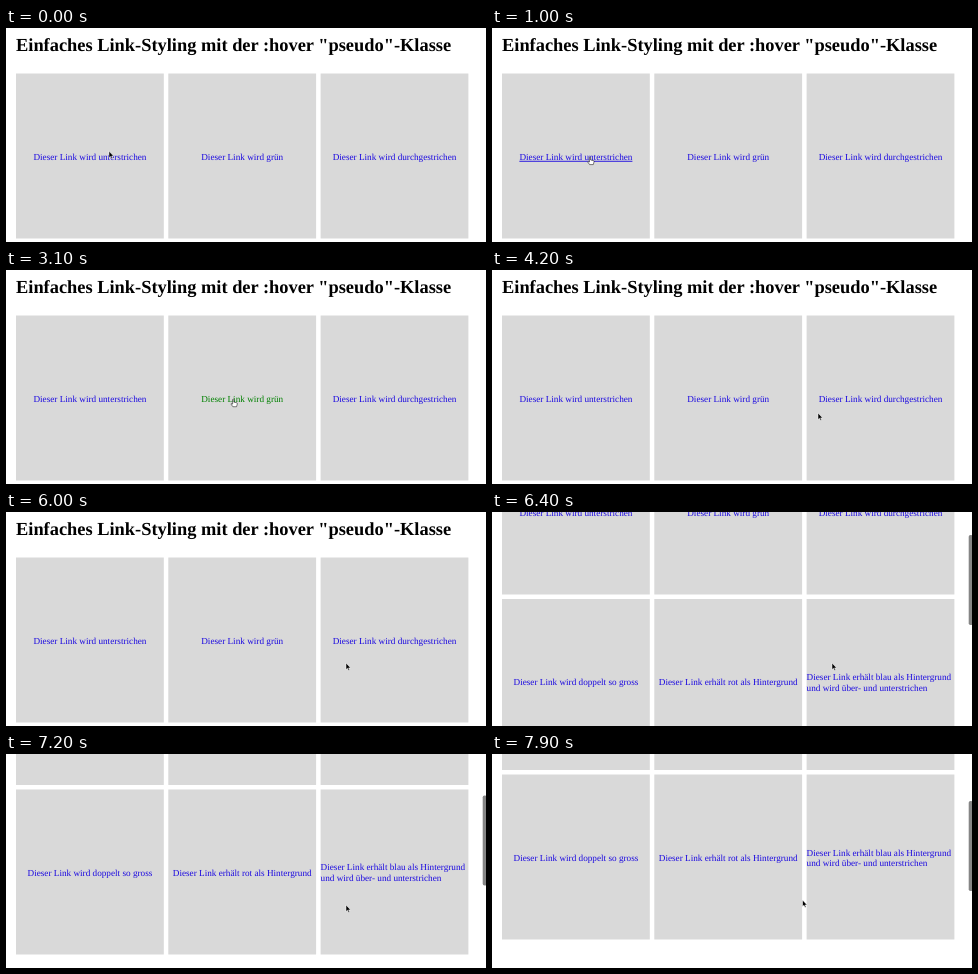
Write an HTML page that moves like this. It is 480 by 214 pixels and loops after 8000 ms.

```html
<!DOCTYPE html>
<html lang="de">
<head>
<meta charset="utf-8">
<title>Link-Styling</title>
<style>
  html, body { margin: 0; width: 100%; height: 100%; overflow: hidden; background: #fff; }
  svg { display: block; width: 480px; height: 214px; }
  text { font: 9.2px "Liberation Serif", Times, serif; fill: #1c0ae0; text-rendering: geometricPrecision; }
  .title { font-size: 18.4px; font-weight: bold; fill: #000; }
  .box { fill: #d9d9d9; }
  .hover-under { text-decoration: underline; }
  .hover-green { fill: #008000; }
  .hover-through { text-decoration: line-through; }
</style>
</head>
<body>
<svg viewBox="0 0 480 214">
  <g id="page">
    <text class="title" x="10" y="23">Einfaches Link-Styling mit der :hover "pseudo"-Klasse</text>
  </g>
  <rect id="thumb" x="476.7" width="4" height="90" rx="1.8" fill="#858585"/>
  <g id="cursor" stroke="#fff" stroke-width=".5" stroke-linejoin="round">
    <path id="arrow" d="M0 0V6.6L1.5 5.3L2.5 7.6L3.6 7.1L2.6 4.9H4.6Z" fill="#000"/>
    <path id="hand" d="M-.6 .3Q0-.4 .6 .3V3L3.6 3.7Q4.2 4 4 5L3.3 7.6H-.4L-2.3 4.8Q-2.1 3.8-.6 5Z" fill="#fff" stroke="#000"/>
  </g>
</svg>
<script>
const LOOP = 8000, STEP = 100;
const BOX_W = 147.8, BOX_H = 165, COL = 152.3, ROW = 169.5, LEFT = 10, TOP = 45.5;
const BASELINE = 86.3, LINE = 10.6;

const cells = [
  { lines: ["Dieser Link wird unterstrichen"], hover: "hover-under" },
  { lines: ["Dieser Link wird grün"], hover: "hover-green" },
  { lines: ["Dieser Link wird durchgestrichen"], hover: "hover-through" },
  { lines: ["Dieser Link wird doppelt so gross"] },
  { lines: ["Dieser Link erhält rot als Hintergrund"] },
  { lines: ["Dieser Link erhält blau als Hintergrund", "und wird über- und unterstrichen"] }
];

// time, x, y of the pointer tip
const pointerPath = [
  [0, 103, 123.2], [200, 101, 128], [1000, 98, 129], [1300, 102, 140],
  [2000, 196.5, 140], [2400, 222, 130], [3200, 228, 129], [3600, 240, 142],
  [4200, 326, 143], [4500, 365, 130], [5200, 368, 129], [5600, 355, 145],
  [6000, 340, 151], [7400, 340, 151], [7900, 310.5, 146]
];
const scrollStart = [[6100, 0], [6200, 28], [6300, 80], [6400, 128]];

const byId = id => document.getElementById(id);
const page = byId("page");

function add(tag, attrs, content = "") {
  const node = document.createElementNS("http://www.w3.org/2000/svg", tag);
  for (const key in attrs) node.setAttribute(key, attrs[key]);
  node.textContent = content;
  return page.appendChild(node);
}

cells.forEach((cell, i) => {
  const x = LEFT + COL * (i % 3), y = TOP + ROW * Math.floor(i / 3);
  const single = cell.lines.length === 1;
  add("rect", { class: "box", x, y, width: BOX_W, height: BOX_H });
  cell.nodes = cell.lines.map((line, n) => add("text", {
    x: single ? x + BOX_W / 2 : x,
    y: y + BASELINE + (single ? 0 : (n - 0.5) * LINE),
    "text-anchor": single ? "middle" : "start"
  }, line));
  cell.center = x + BOX_W / 2;
  cell.base = y + BASELINE;
});

function sample(table, t) {
  const next = table.findIndex(row => row[0] > t);
  if (next === 0) return table[0].slice(1);
  if (next < 0) return table[table.length - 1].slice(1);
  const a = table[next - 1], b = table[next];
  const k = (t - a[0]) / (b[0] - a[0]);
  return a.slice(1).map((v, i) => v + (b[i + 1] - v) * k);
}

// quick swipe, then inertia fading out
function scrollAt(t) {
  return t < 6400 ? sample(scrollStart, t)[0] : 203 - 75 * Math.exp((6400 - t) / 689);
}

function draw(t) {
  const scroll = scrollAt(t);
  const [x, y] = sample(pointerPath, t);
  page.setAttribute("transform", `translate(0 ${-scroll})`);
  byId("thumb").setAttribute("y", 23 + (scroll - 128) * 0.36);
  byId("thumb").style.display = scroll > 0 ? "" : "none";
  byId("cursor").setAttribute("transform", `translate(${x} ${y})`);

  let over = false;
  for (const cell of cells.filter(c => c.hover)) {
    const half = cell.nodes[0].getComputedTextLength() / 2;
    const base = cell.base - scroll;
    const hit = Math.abs(x - cell.center) < half && y > base - 8.2 && y < base + 2;
    cell.nodes[0].classList.toggle(cell.hover, hit);
    over = over || hit;
  }
  byId("arrow").style.display = over ? "none" : "";
  byId("hand").style.display = over ? "" : "none";
}

const start = performance.now();
function tick() {
  const t = (performance.now() - start) % LOOP;
  draw(Math.floor(t / STEP) * STEP);
  requestAnimationFrame(tick);
}
tick();
</script>
</body>
</html>
```
